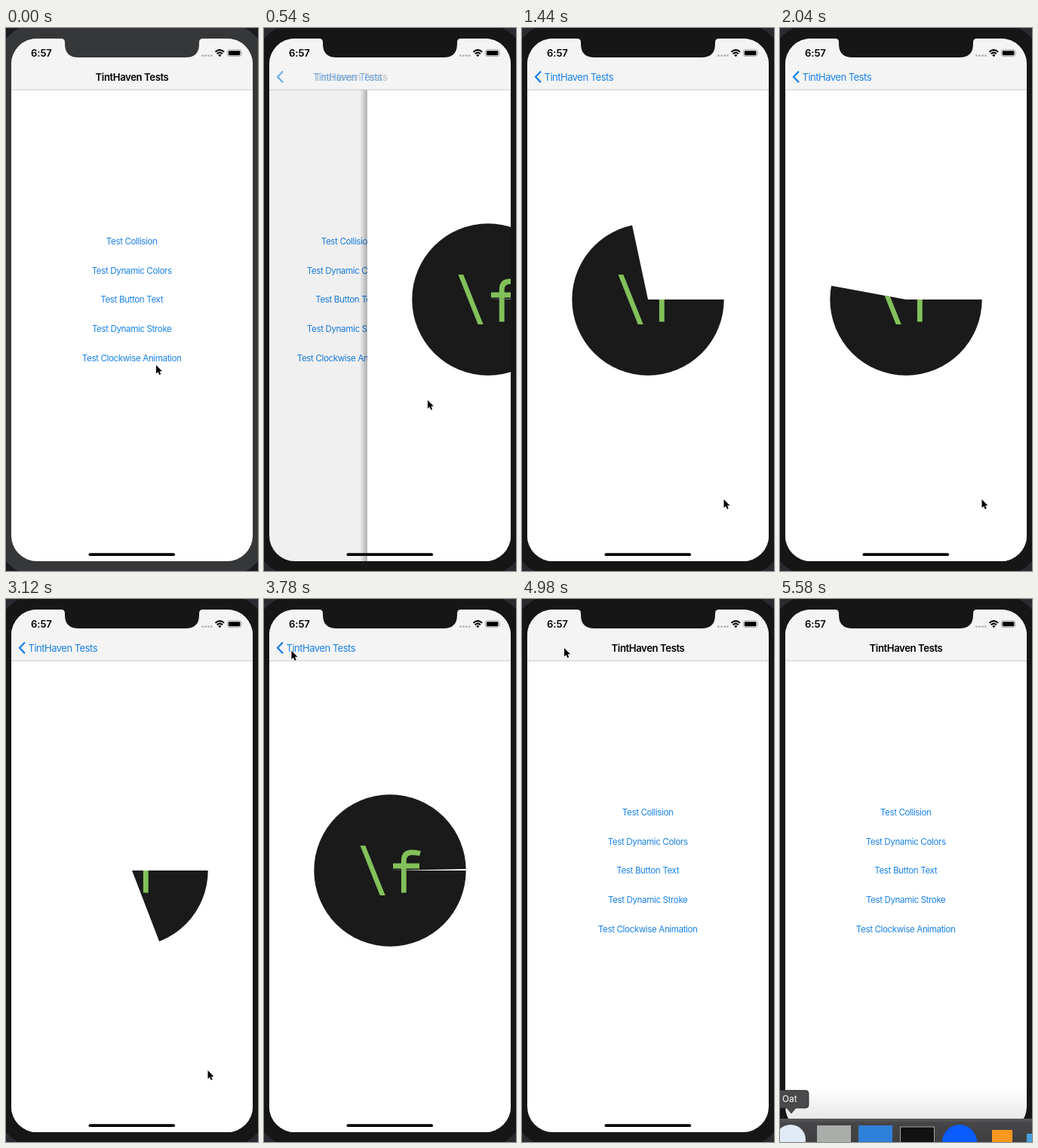
An HTML page for the animation above (5.64 s loop, 334 by 720 pixels).

```html
<!DOCTYPE html>
<html lang="en">
<head>
<meta charset="utf-8">
<title>Clockwise animation</title>
<style>
  html, body { margin: 0; width: 100%; height: 100%; overflow: hidden; background: #1b1c20; }
  svg { display: block; width: 334px; height: 720px; }
  text { font-family: Inter, "Open Sans", sans-serif; white-space: pre; }
  .semi { font-size: 13.14px; font-weight: 600; letter-spacing: -.4px; }
  .label { font-size: 13px; letter-spacing: -.5px; fill: #1a82e8; }
  .item { font-size: 11.6px; letter-spacing: -.38px; fill: #1a82e8; text-anchor: middle; }
</style>
</head>
<body>
<svg viewBox="0 0 334 720">
  <defs>
    <clipPath id="screen"><rect x="7" y="14" width="320" height="693" rx="34"/></clipPath>
    <clipPath id="pie"><path id="sector"/></clipPath>
    <linearGradient id="edge">
      <stop offset="0" stop-color="#000" stop-opacity="0"/>
      <stop offset="1" stop-color="#000" stop-opacity=".28"/>
    </linearGradient>
    <linearGradient id="haze" x2="0" y2="1">
      <stop offset="0" stop-color="#000" stop-opacity="0"/>
      <stop offset="1" stop-color="#000" stop-opacity=".1"/>
    </linearGradient>
    <linearGradient id="shelf" x2="0" y2="1">
      <stop offset="0" stop-color="#5a5a5c"/>
      <stop offset=".15" stop-color="#464648"/>
      <stop offset="1" stop-color="#3c3c3e"/>
    </linearGradient>
  </defs>

  <rect id="desk" width="334" height="720"/>
  <rect class="body" x="-11" y="-5" width="356" height="731" rx="51"/>

  <g clip-path="url(#screen)">
    <rect x="7" y="14" width="320" height="693" fill="#fff"/>
    <g id="list"></g>
    <rect id="dim" x="7" y="82" width="320" height="625"/>
    <g id="detail">
      <rect x="-3" y="82" width="10" height="625" fill="url(#edge)"/>
      <rect x="7" y="82" width="320" height="625" fill="#fff"/>
      <g clip-path="url(#pie)">
        <circle cx="167" cy="360" r="100.7" fill="#1a1a1a"/>
        <path d="M127.5 327h6.8L160.7 393h-7z" fill="#82c15a"/>
        <path d="M185.3 389.5V347Q185.3 336 196 336Q202 336 207 337.5M171 354H206"
              fill="none" stroke="#82c15a" stroke-width="6.8"/>
      </g>
    </g>

    <rect x="7" y="14" width="320" height="68" fill="#f4f4f4"/>
    <rect x="7" y="81.5" width="320" height="1" fill="#cacaca"/>
    <text id="title" class="semi" x="167" y="69.5" text-anchor="middle">TintHaven Tests</text>
    <path id="chevron" d="M25 57.5L18 64.8L25 72.1" fill="none" stroke="#1a82e8" stroke-width="2.3"/>
    <text id="back" class="label" x="29.5" y="69.5">TintHaven Tests</text>

    <text class="semi" x="33" y="38" style="letter-spacing:-.1px">6:57</text>
    <g fill="#b9b9b9">
      <circle cx="260.5" cy="36.5" r="1.5"/><circle cx="264.5" cy="36.5" r="1.5"/>
      <circle cx="268.5" cy="36.5" r="1.5"/><circle cx="272.3" cy="36.5" r="1.5"/>
    </g>
    <g fill="none" stroke="#000" stroke-width="2">
      <path d="M277.5 31.7Q283.3 26.6 289.1 31.7"/>
      <path d="M279.7 34.2Q283.3 31.1 286.9 34.2"/>
    </g>
    <path d="M281.2 36Q283.3 34.2 285.4 36L283.3 38.2z"/>
    <rect x="293.4" y="28.8" width="18.4" height="8.8" rx="2.4" fill="none" stroke="#999" stroke-width=".8"/>
    <rect x="294.8" y="30.2" width="15.6" height="6" rx="1.3"/>
    <path d="M312.7 31.7q1.4 1.5 0 3z" fill="#999"/>
    <rect x="109.5" y="696.3" width="114.5" height="3.8" rx="1.9"/>
  </g>
  <path class="body" d="M73 13V14Q78 14 78 19V21Q78 39 96 39H238Q256 39 256 21V19Q256 14 261 14V13z"/>

  <rect id="glow" x="7" y="648" width="320" height="45" fill="url(#haze)"/>
  <g id="dock">
    <rect x="-4" y="689" width="342" height="40" fill="url(#shelf)"/>
    <circle cx="14" cy="717" r="20" fill="#dfeaf5"/>
    <rect x="49" y="698" width="45" height="45" fill="#a9aeab"/>
    <rect x="104" y="698" width="45" height="45" fill="#2f80d8"/>
    <rect x="159.5" y="700" width="45" height="45" fill="#111" stroke="#a5a5a5"/>
    <circle cx="238" cy="720" r="23" fill="#0a5cff"/>
    <rect x="281" y="704" width="27" height="40" fill="#f89820"/>
    <rect x="327" y="709" width="20" height="30" fill="#4a9fe0"/>
  </g>
  <g id="tip">
    <path d="M-5 651.5H34Q38 651.5 38 655.5V671Q38 675 34 675H21L15 682L9 675H-5z"
          fill="#4a4a4c" stroke="#2c2c2e" stroke-width=".8"/>
    <text x="3" y="667.3" fill="#fff" font-size="11.8">Oat</text>
  </g>
  <path id="cursor" d="M0 0V11.3L2.6 8.9L4.3 12.9L6.2 12.1L4.5 8.2H8z"
        stroke="#fff" stroke-width="1" paint-order="stroke"/>
</svg>

<script>
const LOOP = 5640, STEP = 60;
const PUSH = 440, POP = 4424, PRESS = 4360;
const SPINS = [533, 3770], RATE = 0.1125;
const ITEMS = ["Test Collision", "Test Dynamic Colors", "Test Button Text",
               "Test Dynamic Stroke", "Test Clockwise Animation"];
// time, x, y of the pointer tip
const POINTER = [
  [0, 199, 447], [420, 199, 447], [780, 268, 626], [1000, 267.5, 625],
  [3180, 267.5, 625], [3640, 23, 71], [3960, 56, 65], [5040, 56, 65],
  [5400, 14, 726], [LOOP, 14, 726]
];

const $ = id => document.getElementById(id);
const set = (id, name, value) => $(id).setAttribute(name, value);
const move = (id, x, y = 0) => set(id, "transform", `translate(${x} ${y})`);
const fade = (id, o) => set(id, "opacity", clamp(o));
const clamp = v => Math.max(0, Math.min(1, v));
const smooth = u => u * u * (3 - 2 * u);

function spring(ms) {
  if (ms <= 0) return 0;
  if (ms > 450) return 1;
  const u = ms * 0.02;
  return 1 - (1 + u) * Math.exp(-u);
}

function pointerAt(t) {
  const i = POINTER.findIndex(k => k[0] > t);
  const a = POINTER[i - 1], b = POINTER[i];
  const u = smooth((t - a[0]) / (b[0] - a[0]));
  return [a[1] + (b[1] - a[1]) * u, a[2] + (b[2] - a[2]) * u];
}

function sectorPath(gap) {
  const r = 102, a = gap * Math.PI / 180;
  const x = 167 + r * Math.cos(a), y = 360 - r * Math.sin(a);
  return `M167 360L${x} ${y}A${r} ${r} 0 ${gap < 180 ? 1 : 0} 0 ${167 + r} 360Z`;
}

ITEMS.forEach((label, i) => {
  const el = document.createElementNS("http://www.w3.org/2000/svg", "text");
  el.setAttribute("class", "item");
  el.setAttribute("x", 166.7);
  el.setAttribute("y", 287 + i * 38.7);
  el.textContent = label;
  $("list").append(el);
});
const tapped = $("list").lastChild;

function draw(t) {
  // the first and the settled pose are held for two steps
  t = t < 2 * STEP ? 0 : Math.floor(t / STEP) * STEP;

  const p = spring(t - PUSH) - spring(t - POP);
  move("list", -96 * p);
  move("detail", 320 * (1 - p));
  fade("detail", p > 0 ? 1 : 0);
  fade("dim", 0.1 * p);
  tapped.setAttribute("opacity", t >= 360 && t < 480 ? 0.3 : 1);

  const start = t < SPINS[1] ? SPINS[0] : SPINS[1];
  const gap = Math.max(0.01, Math.min(359.99, (t - start) * RATE));
  set("sector", "d", sectorPath(gap));

  const pressed = t >= PRESS;
  move("title", -87 * p);
  fade("title", 1 - 1.4 * p);
  move("back", 87 * (1 - p));
  fade("back", p * (pressed ? 0.33 : 1));
  fade("chevron", p * (pressed ? 0.58 : 1));

  const dark = t > 0;
  set("desk", "fill", dark ? "#292b30" : "#1b1c20");
  for (const el of document.querySelectorAll(".body"))
    el.setAttribute("fill", dark ? "#161616" : "#363739");

  const rise = smooth(clamp((t - 5380) / 150));
  move("dock", 0, 34 * (1 - rise));
  fade("dock", rise > 0 ? 1 : 0);
  fade("glow", rise);
  fade("tip", t >= 5520 ? 1 : 0);

  move("cursor", ...pointerAt(t));
}

const begin = performance.now();
function tick() {
  draw((performance.now() - begin) % LOOP);
  requestAnimationFrame(tick);
}
tick();
</script>
</body>
</html>
```
